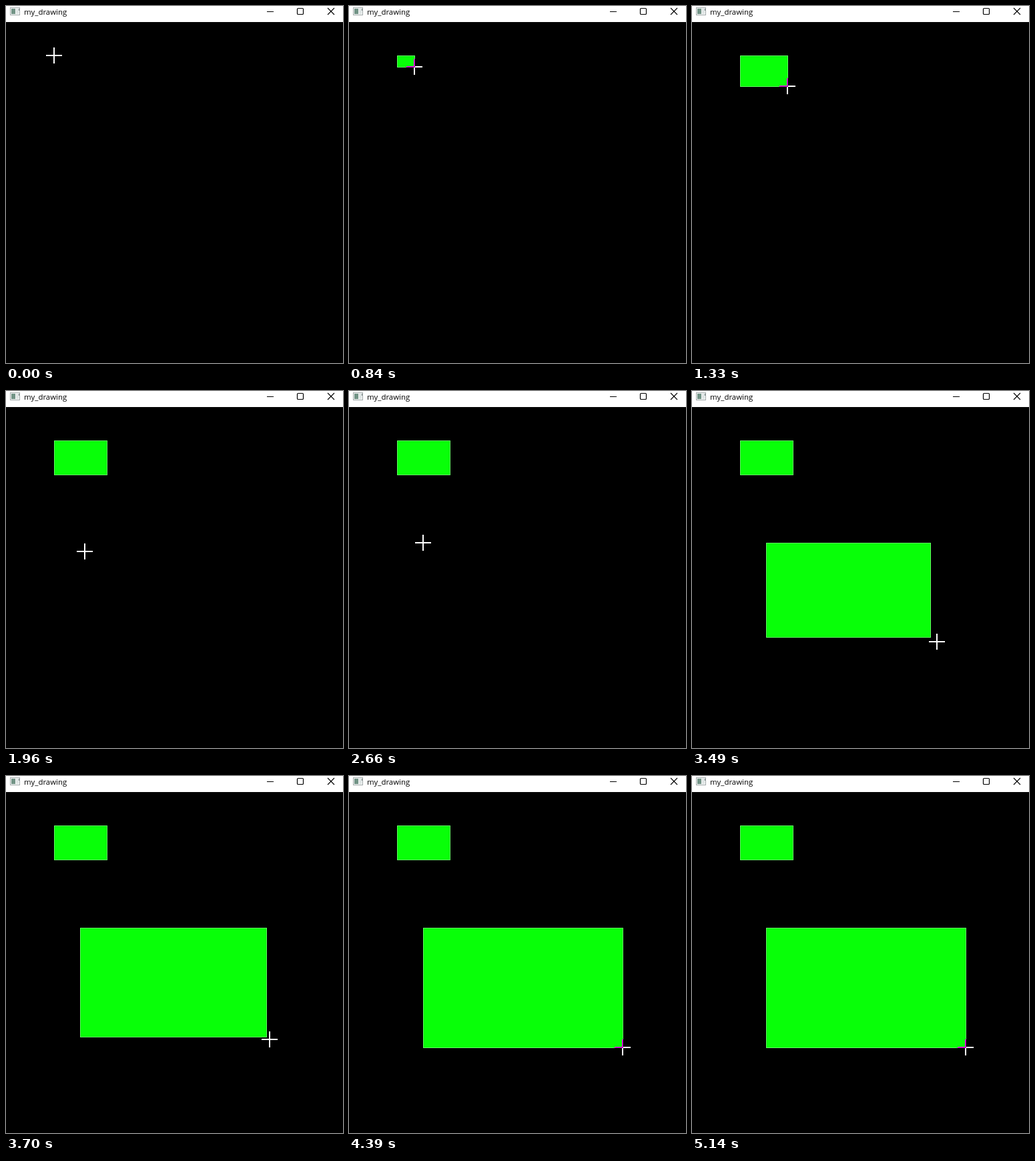
Recreate the animation shown at these times as an HTML page. Size 505x534 px, loop 5.34 s.

```html
<!DOCTYPE html>
<html lang="en">
<head>
<meta charset="utf-8">
<title>my_drawing</title>
<style>
  html, body { margin: 0; width: 100%; height: 100%; overflow: hidden; background: #000; }
  svg { display: block; width: 505px; height: 534px; }
  text { font: 11.4px "Open Sans", "Noto Sans", sans-serif; fill: #000; }
  .box { fill: #08ff08; stroke: #60fa60; }
  #cross { fill: #fff; mix-blend-mode: difference; }
</style>
</head>
<body>
<svg viewBox="0 0 505 534">
  <rect width="505" height="534"/>
  <rect width="505" height="24" fill="#fff"/>
  <g>
    <rect x="6.5" y="2.5" width="14" height="11" fill="#f4f6f6" stroke="#a3abab"/>
    <rect x="8" y="4" width="6" height="8" fill="#729486"/>
    <rect x="15" y="4" width="4" height="8" fill="#dfe5e5"/>
    <path d="M19.5 4v3" stroke="#7d8686"/>
  </g>
  <text x="27" y="13">my_drawing</text>
  <g fill="none" stroke="#000">
    <path d="M391 8.5h10"/>
    <rect x="436.5" y="3.5" width="9" height="9" rx="1.3" stroke-width="1.2"/>
    <path d="M482 3l10 10M492 3l-10 10" stroke-width="1.1"/>
  </g>
  <rect class="box" id="small"/>
  <rect class="box" id="large"/>
  <path id="cross" d="M-12-1H-1V-12H1V-1H12V1H1V12H-1V1H-12Z"/>
</svg>
<script>
const LOOP = 5340, TICK = 70, LAG = 35;
const HOLD = 3150, RESUME = 3280; // one refresh lasts longer

const drags = [
  { id: 'small', x: 72, y: 74, from: 600, to: 1470, lag: 0 },
  { id: 'large', x: 111, y: 227, from: 2690, to: LOOP, lag: LAG }
];

// pointer moves: each ends at a time and place, easing out by a power
const moves = [
  { end: 600, x: 72, y: 74 },
  { end: 1470, x: 151, y: 125, power: 1.25 },
  { end: 1680, x: 125, y: 252 },
  { end: 2240, x: 111, y: 227 },
  { end: 2690, x: 111, y: 227 },
  { end: 3245, x: 259, y: 302, power: 1.5 },
  { end: 3280, x: 278, y: 317 },
  { end: 3665, x: 390, y: 390, power: 2 },
  { end: 4040, x: 410, y: 406, power: 3 }
];

const byId = id => document.getElementById(id);
const mix = (a, b, p) => Math.round(a + (b - a) * p);

function pointer(t) {
  let a = moves[0];
  for (const b of moves.slice(1)) {
    if (t < b.end) {
      const f = Math.max(0, (t - a.end) / (b.end - a.end));
      const p = 1 - (1 - f) ** (b.power || 1);
      return [mix(a.x, b.x, p), mix(a.y, b.y, p)];
    }
    a = b;
  }
  return [a.x, a.y];
}

function refresh(t) {
  return t < RESUME
    ? Math.min(HOLD, t - t % TICK)
    : t - (t - RESUME) % TICK;
}

function drawBox({ id, x, y, from, to, lag }, t) {
  const [px, py] = pointer(Math.min(t - lag, to));
  const box = byId(id);
  box.style.display = t > from && px > x ? '' : 'none';
  box.setAttribute('x', x + 0.5);
  box.setAttribute('y', y + 0.5);
  box.setAttribute('width', Math.max(0, px - x));
  box.setAttribute('height', Math.max(0, py - y));
}

function draw(now) {
  const t = refresh(now % LOOP);
  drags.forEach(d => drawBox(d, t));
  byId('cross').setAttribute('transform', `translate(${pointer(t).join(' ')})`);
}

const start = performance.now();
function loop() {
  draw(Math.max(0, performance.now() - start));
  requestAnimationFrame(loop);
}
loop();
</script>
</body>
</html>
```
